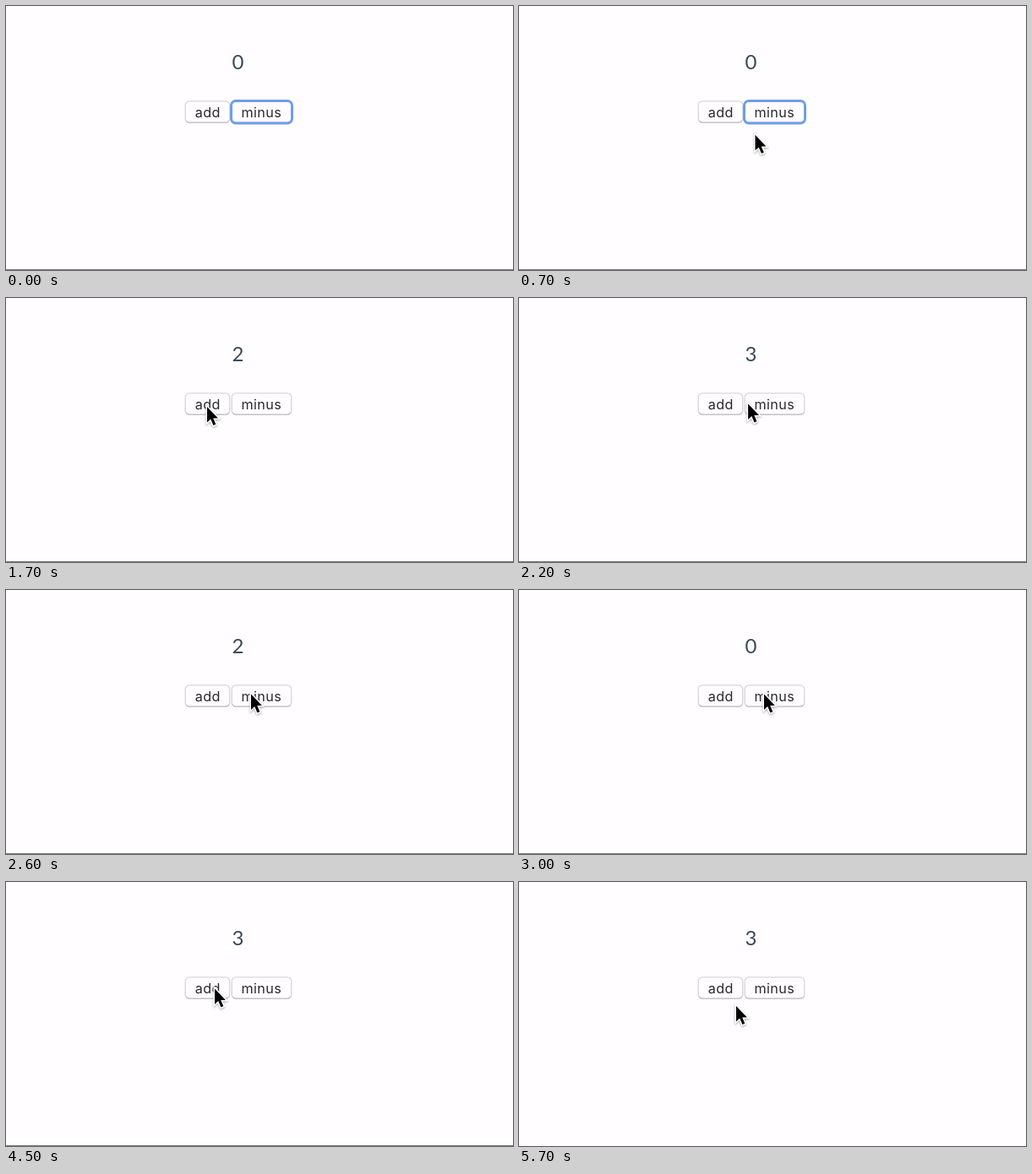
Write an HTML page that moves like this. It is 600 px wide and 313 px high and loops after 5800 ms.

```html
<!DOCTYPE html>
<html lang="en">
<head>
<meta charset="utf-8">
<title>Counter</title>
<style>
  html, body { margin: 0; width: 100%; height: 100%; overflow: hidden; background: #fffdff; }
  svg { display: block; width: 600px; height: 313px; }
  text { text-anchor: middle; }
  #count { font: 24px Lato, sans-serif; fill: #394959; }
  .button text { font: 16.2px Inter, sans-serif; letter-spacing: .35px; fill: #29282b; }
  .button rect { fill: #fffdff; stroke: url(#edge); stroke-width: 1.2; }
  .button.pressed rect { fill: url(#blue); stroke: url(#blueEdge); }
  .button.pressed text { fill: #17254f; }
  #cursor { filter: drop-shadow(0 1.5px 1px rgba(0, 0, 0, .35)); }
</style>
</head>
<body>
<svg viewBox="0 0 600 313">
  <defs>
    <linearGradient id="edge" x2="0" y2="1">
      <stop offset="0" stop-color="#d9d6dc"/>
      <stop offset=".85" stop-color="#d1ced4"/>
      <stop offset="1" stop-color="#b5b2b8"/>
    </linearGradient>
    <linearGradient id="blue" x2="0" y2="1">
      <stop offset="0" stop-color="#4288f8"/>
      <stop offset="1" stop-color="#0b56ec"/>
    </linearGradient>
    <linearGradient id="blueEdge" x2="0" y2="1">
      <stop offset="0" stop-color="#3b7cf0"/>
      <stop offset="1" stop-color="#0a48cf"/>
    </linearGradient>
  </defs>
  <text id="count" x="274.5" y="75">0</text>
  <g id="add" class="button">
    <rect x="212.2" y="112.8" width="52.6" height="25.4" rx="5"/>
    <text x="238.8" y="132.2">add</text>
  </g>
  <g id="minus" class="button">
    <rect x="267.2" y="112.8" width="70.6" height="25.4" rx="5"/>
    <text x="302.3" y="132.2">minus</text>
  </g>
  <rect id="focus" x="266.5" y="112.5" width="72" height="26.5" rx="5.5" fill="none" stroke="#6e9dea" stroke-width="3"/>
  <rect id="rule" y="312" width="600" height="1" fill="#7b7b7d"/>
  <path id="cursor" d="M0 0V18.5L4.2 14.6L7.4 22L10.3 20.8L7.2 13.6H12.9Z"
        fill="#000" stroke="#fff" stroke-width="3" paint-order="stroke"/>
</svg>
<script>
  const LOOP = 5800, STEP = 100, APPEAR = 200, RULE_END = 5700;
  const el = id => document.getElementById(id);
  const show = (id, on) => el(id).setAttribute("visibility", on ? "visible" : "hidden");
  const easeOut = p => 1 - (1 - p) ** 2.5;

  const origin = { x: 445, y: 253 };
  const glides = [
    { from: 200, to: 300, x: 445, y: 250 },
    { from: 400, to: 1000, x: 244, y: 132 },
    { from: 1000, to: 1100, x: 238, y: 129 },
    { from: 2100, to: 2400, x: 290, y: 123.5 },
    { from: 3500, to: 3700, x: 229, y: 124 },
    { from: 4400, to: 4500, x: 247, y: 126.5 },
    { from: 4500, to: 5000, x: 257, y: 147 }
  ];
  // Each burst is three clicks, every press one step long
  const bursts = [
    { button: "add", start: 1300, gap: 300, change: 1 },
    { button: "minus", start: 2500, gap: 200, change: -1 },
    { button: "add", start: 3700, gap: 200, change: 1 }
  ];
  const clicks = bursts.flatMap(b =>
    [0, 1, 2].map(i => ({ ...b, down: b.start + i * b.gap, up: b.start + i * b.gap + STEP })));

  function pointer(t) {
    let { x, y } = origin;
    for (const g of glides) {
      const p = easeOut(Math.min(1, Math.max(0, (t - g.from) / (g.to - g.from))));
      x += (g.x - x) * p;
      y += (g.y - y) * p;
    }
    return { x, y };
  }

  function draw(now) {
    const t = Math.floor(now % LOOP / STEP) * STEP;
    const { x, y } = pointer(t);
    el("cursor").setAttribute("transform", `translate(${x} ${y})`);
    show("cursor", t >= APPEAR);
    show("focus", t < clicks[0].down);
    show("rule", t < RULE_END);
    for (const name of ["add", "minus"]) {
      const pressed = clicks.some(c => c.button === name && t >= c.down && t < c.up);
      el(name).classList.toggle("pressed", pressed);
    }
    el("count").textContent = clicks.reduce((sum, c) => sum + (t >= c.up ? c.change : 0), 0);
  }

  let start;
  function tick(now) {
    start ??= now;
    draw(now - start);
    requestAnimationFrame(tick);
  }
  draw(0);
  requestAnimationFrame(tick);
</script>
</body>
</html>
```
